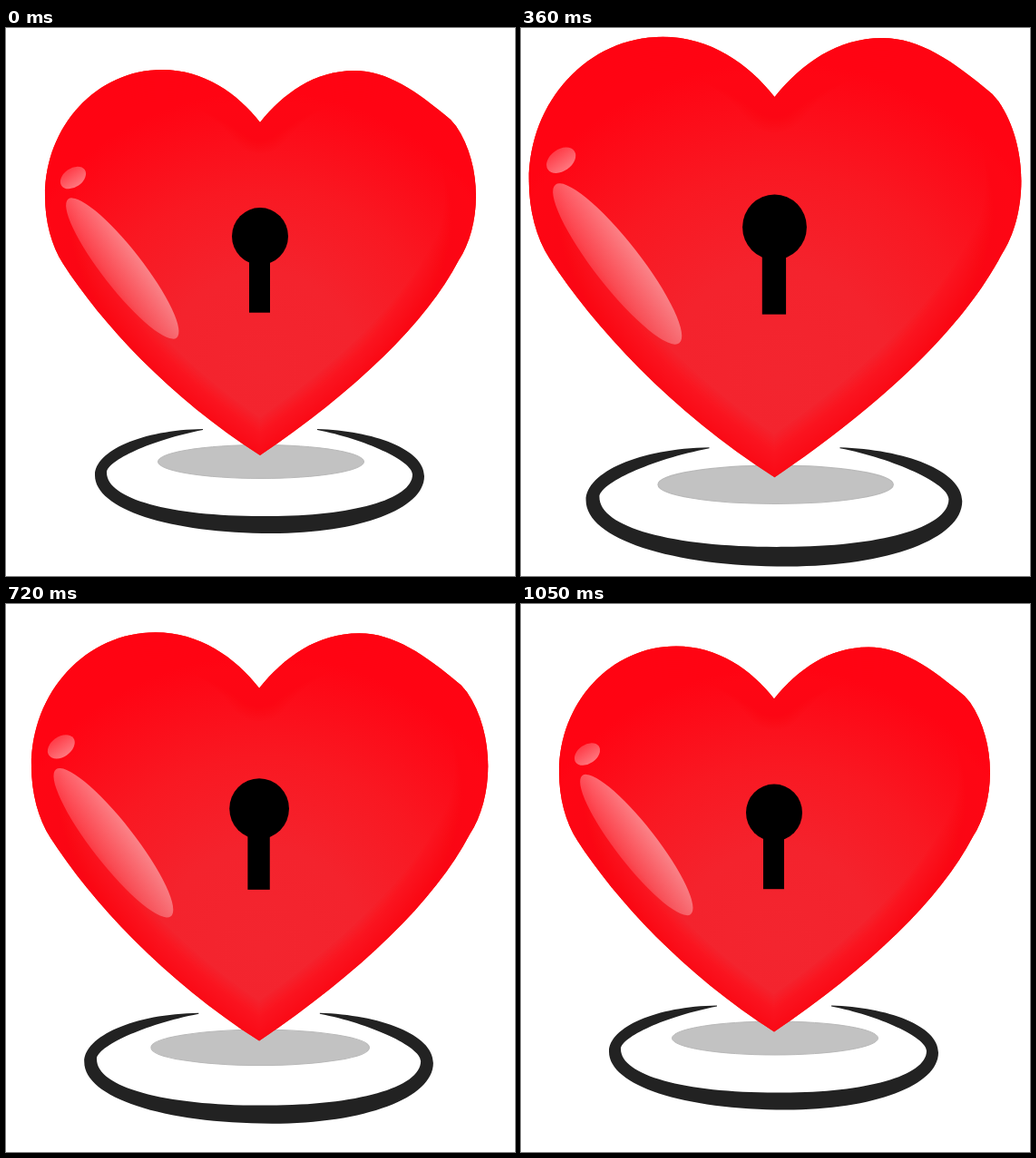
An HTML page with a canvas for the animation above (1.28 s loop, 561 by 604 pixels).

```html
<!DOCTYPE html>
<html lang="en">
<head>
<meta charset="utf-8">
<title>Beating heart lock</title>
<style>
html, body { margin: 0; width: 100%; height: 100%; overflow: hidden; background: #fff; }
canvas { display: block; width: 561px; height: 604px; }
</style>
</head>
<body>
<canvas id="stage" width="561" height="604"></canvas>
<script>
const W = 561, H = 604, LOOP = 1280, STEP = 30;
const PEAK = 450, REST = 856, LAST = 1050, GROWTH = 0.178;
const PIVOT = { x: 280.5, y: 301.7 };
const ctx = document.getElementById('stage').getContext('2d');

const heart = new Path2D(`M280 104 C255 72 218 46 172 46 C100 46 43 108 43 185
  C43 213 50 240 63 260 C105 325 180 407 280 471
  C385 400 463 325 499 256 C511 238 518 212 518 185
  C518 158 511 130 496 108 L490 101 C452 69 420 47 384 47
  C340 47 306 72 280 104 Z`);

const ring = new Path2D(`M217 442 C150 443 98 466 98 493 C98 530 180 557 293 557
  C390 557 461 530 461 494 C461 464 405 444 343 442 L343 443
  C395 453 448 477 448 492 C448 520 380 538 290 538
  C185 539 111 520 111 490 C111 477 160 454 217 443 Z`);

const body = ctx.createRadialGradient(283, 375, 0, 283, 375, 305);
body.addColorStop(0, '#f3252f');
body.addColorStop(0.35, '#f4232d');
body.addColorStop(0.65, '#f91822');
body.addColorStop(1, '#ff0413');

function ellipse(x, y, rx, ry, angle, fill) {
  ctx.beginPath();
  ctx.ellipse(x, y, rx, ry, angle, 0, Math.PI * 2);
  ctx.fillStyle = fill;
  ctx.fill();
}

// White shine that runs across the short axis, from upper right to lower left.
function gloss(x, y, rx, ry, degrees, from, to) {
  ctx.save();
  ctx.translate(x, y);
  ctx.rotate(degrees * Math.PI / 180);
  const shine = ctx.createLinearGradient(0, -ry, 0, ry);
  shine.addColorStop(0, `rgba(255,255,255,${from})`);
  shine.addColorStop(1, `rgba(255,255,255,${to})`);
  ellipse(0, 0, rx, ry, 0, shine);
  ctx.restore();
}

function drawHeart() {
  ctx.fillStyle = body;
  ctx.fill(heart);

  // Stacked strokes make a soft red rim inside the outline.
  ctx.save();
  ctx.clip(heart);
  ctx.lineJoin = 'round';
  ctx.strokeStyle = 'rgba(255,2,18,0.075)';
  for (let w = 4; w <= 68; w += 4) {
    ctx.lineWidth = w;
    ctx.stroke(heart);
  }
  ctx.restore();

  gloss(74, 165, 15.5, 10.5, -35, 0.22, 0.45);
  gloss(128.3, 265, 97, 22, 52, 0.46, 0.17);

  ellipse(280, 229.5, 31, 31.5, 0, '#000');
  ctx.fillRect(268, 252, 23, 61.7);
}

function drawShadow() {
  ellipse(281, 478, 113.5, 18.5, 0, '#c2c2c2');
  ctx.strokeStyle = '#b9b9b9';
  ctx.lineWidth = 1;
  ctx.stroke();
}

function scaleAt(t) {
  if (t <= PEAK) return 1 + GROWTH * t / PEAK;
  return 1 + GROWTH * Math.max(0, (REST - t) / (REST - PEAK));
}

function draw(now) {
  const t = Math.min(LAST, Math.floor((now % LOOP) / STEP) * STEP);
  const s = scaleAt(t);
  const drift = Math.min(1, t / 840);

  ctx.setTransform(1, 0, 0, 1, 0, 0);
  ctx.fillStyle = '#fff';
  ctx.fillRect(0, 0, W, H);

  ctx.translate(PIVOT.x - drift, PIVOT.y + drift / 2);
  ctx.scale(s, s);
  ctx.translate(-PIVOT.x, -PIVOT.y);

  ctx.fillStyle = '#222';
  ctx.fill(ring);
  drawShadow();
  drawHeart();
}

const start = performance.now();
function tick() {
  draw(performance.now() - start);
  requestAnimationFrame(tick);
}
tick();
</script>
</body>
</html>
```
